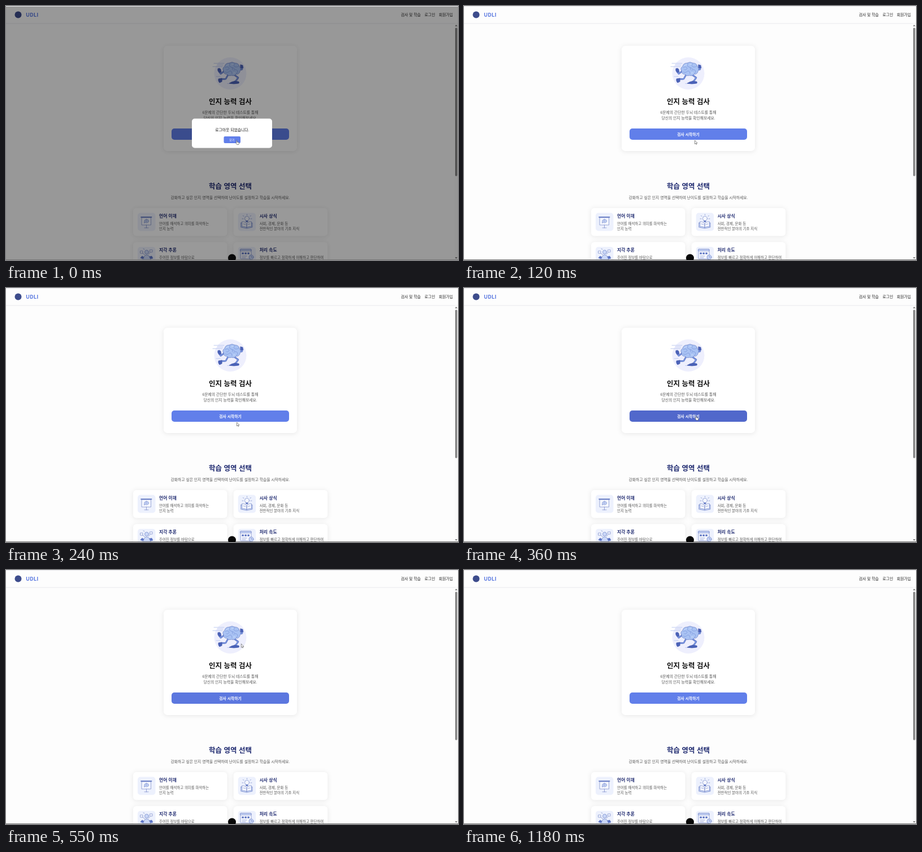
These frames come from a looping animation (800x450 px, 1610 ms). An HTML page:

```html
<!DOCTYPE html>
<html lang="ko">
<head>
<meta charset="utf-8">
<style>
html, body { margin: 0; width: 100%; height: 100%; overflow: hidden; background: #fdfdfd }
svg { display: block; width: 800px; height: 450px }
text { font: 6.8px "Noto Sans CJK KR", "Noto Sans KR", "Noto Sans CJK", sans-serif; fill: #555 }
.mid { text-anchor: middle }
.nav { font-weight: 500; fill: #222; text-anchor: end }
.head { font-size: 12.5px; font-weight: 700 }
.name { font-size: 7.8px; font-weight: 700; fill: #1f2a70 }
.desc { font-size: 6.43px }
.white { fill: #fff; font-weight: 600 }
.panel { fill: #fff; filter: drop-shadow(0 1.5px 4px rgba(0, 0, 0, .09)) }
.art { fill: #f6f8ff; stroke: #5f74bd; stroke-width: .6; stroke-linejoin: round; stroke-linecap: round }
.art .soft { fill: #cbd8f8 }
.art .dark { fill: #5b74c8 }
.art .line { fill: none }
.cursor { fill: #fff; stroke: #444; stroke-width: .6; stroke-linejoin: round }
</style>
</head>
<body>
<svg viewBox="0 0 800 450">
  <rect width="800" height="450" fill="#fdfdfd"/>
  <path d="M0 .5H800M0 31H800" stroke="#e9e9ec"/>
  <circle cx="21.5" cy="15.5" r="6" fill="#3d4c8c"/>
  <text x="35" y="19.4" style="font-size:9.4px;font-weight:700;fill:#5b79e0">UDLI</text>
  <text class="nav" x="734" y="18.4">검사 및 학습</text>
  <text class="nav" x="759.6" y="18.4">로그인</text>
  <text class="nav" x="791" y="18.4">회원가입</text>

  <rect class="panel" x="279" y="70.5" width="236" height="186.5" rx="7"/>
  <circle cx="397" cy="119.5" r="28.5" fill="#eeeffd"/>
  <g class="art">
    <path class="line" d="M368 101.5H386M374 104.5H384M366 107.5H383M372 125H379M392 137.5H406" stroke="#9db0e8"/>
    <g id="limbs" class="line">
      <path id="limb" d="M387 115L380 120L377 116M413 113L418 112L417 107M393 122L389 129L381 130M404 122L411 127L406 134" stroke="#4a62b8" stroke-width="2.4"/>
      <use href="#limb" stroke="#86a3ea"/>
      <path d="M387 115L380 120L377 116M413 113L418 112L417 107M393 122L389 129L381 130M404 122L411 127L406 134" stroke="#86a3ea" stroke-width="1.4"/>
    </g>
    <path d="M375 111q3-2 5 1l1 5q-4 2-6-2zM415 104l4 1 1 5-5 0zM382 128l-6 1q-1 4 2 7l4-2zM405 133l7 1q1 2 0 3q-9 2-17 0q4-3 10-4z" fill="#4a62b8" stroke="#4057a8"/>
    <path d="M385 115q-3-5 2-8q1-6 8-6q5-3 10 0q7 0 8 6q4 4 1 9q-1 5-7 5q-3 4-8 2q-5 2-8-2q-6 0-6-6z" fill="#a9c2f3"/>
    <path class="line" d="M388 109q4-3 7 1q-1 4-5 3M396 102q-2 5 2 6t3 5M405 102q-4 4 1 6q4 1 6-2M388 117q5 2 8-2q4 0 4 5M403 114q4-3 7 1q1 3-3 5M400 109q3 0 5 3" stroke="#6f8bd4"/>
    <path class="line" d="M390 106q3-3 5-2M399 104q3-2 4 0M402 119q2-2 4 0" stroke="#eaf1ff"/>
  </g>
  <text class="mid head" x="397" y="173.5" style="fill:#111">인지 능력 검사</text>
  <text class="mid" x="397" y="191.4">6문제의 간단한 두뇌 테스트를 통해</text>
  <text class="mid" x="397" y="201.4">당신의 인지 능력을 확인해보세요.</text>
  <rect id="start" x="293" y="217" width="208" height="20" rx="5"/>
  <text class="mid white" x="397" y="229.6">검사 시작하기</text>

  <text class="mid head" x="397" y="323.8" style="fill:#1f2a70">학습 영역 선택</text>
  <text class="mid" x="397" y="342">강화하고 싶은 인지 영역을 선택하여 난이도를 설정하고 학습을 시작하세요.</text>
  <g id="cards"></g>
  <g class="art">
    <path class="dark" d="M239 373.500h19v1.200h-19z"/>
    <path d="M240.500 375H256.500V388H240.500z"/>
    <path class="line" d="M248.500 388V393M245 393H252"/>
    <path class="soft" d="M248.500 378a4 3 0 1 1-2 5.500l-2 1l.5-2.500a4 3 0 0 1 3.500-4z"/>
    <path class="line" d="M247 381H250"/>

    <path class="soft" d="M416 384l10 3 10-3v8l-10 2-10-2z"/>
    <path d="M418 382q6 0 8 4v7q-3-3-8-2zM434 382q-6 0-8 4v7q3-3 8-2z"/>
    <circle cx="426.500" cy="376.500" r="4"/>
    <path class="dark" d="M425 380.500h3v2h-3z"/>
    <path class="line" d="M426.500 369v1.500M419.500 371.500l1.500 1M433.500 371.500l-1.500 1M418 377h2M433 377h2M420 386l4 1M432 386l-4 1"/>

    <circle class="soft" cx="249" cy="436" r="3.500"/>
    <path class="soft" d="M243 449q1-8 6-8t7 8z"/>
    <path class="dark" d="M238 446l3-3 3 2-2 3zM254 444l4-1 2 4-4 1z"/>
    <path d="M238 434h4v4h-4zM255 432h4v4h-4z"/>
    <path class="line" d="M242 438l4 3M255 437l-3 3M245 431l-2-1"/>

    <rect x="415" y="431" width="19" height="17" rx="1"/>
    <path class="soft" d="M415 431h19v3h-19z"/>
    <path class="dark" d="M418 437h2.500v2.500h-2.500zM423 437h2.500v2.500h-2.500zM428 437h2.500v2.500h-2.500z"/>
    <path class="line" d="M418 443h8M418 446h6"/>
    <circle class="soft" cx="434" cy="445" r="4"/>
    <path class="line" d="M434 443v2h2"/>
  </g>

  <rect x="794" y="31" width="6" height="419" fill="#fafafa"/>
  <rect x="795" y="38.500" width="3.600" height="263" rx="1.800" fill="#858585"/>
  <path d="M794.800 36L796.800 33L798.800 36zM794.800 445L796.800 448L798.800 445z" fill="#777"/>

  <g id="modal">
    <rect y="1" width="800" height="449" opacity=".4"/>
    <rect x="329" y="199.500" width="142" height="52" rx="5" fill="#fff"/>
    <text class="mid" x="400.300" y="222" style="fill:#111">로그아웃 되었습니다.</text>
    <rect x="385.500" y="231" width="29.500" height="12" rx="2" fill="#617fea"/>
    <text class="mid white" x="400" y="238.800" style="font-size:5px;font-weight:500">닫기</text>
  </g>
  <path d="M0 449.500H800" stroke="#777"/>
  <circle cx="400" cy="446.500" r="7" fill="#080808"/>
  <g id="cursor" class="cursor">
    <path id="arrow" d="M0 0V6.500L1.500 5.200L2.500 7.300L3.500 6.800L2.600 4.800H4.600z"/>
    <path id="hand" d="M-.7 .4q.7-.8 1.300 0V3l3 .7q.6.300.4 1.300L3.300 7.500H.2L-1.800 4.700q.2-.9 1.100-.3z"/>
  </g>
</svg>
<script>
const $ = id => document.getElementById(id);
const clamp = v => Math.max(0, Math.min(1, v));
const mix = (a, b, k) => a.map((v, i) => Math.round(v + (b[i] - v) * k));

const topics = [
  ['언어 이해', '언어를 해석하고 의미를 파악하는', '인지 능력'],
  ['시사 상식', '사회, 경제, 문화 등', '전반적인 분야의 기초 지식'],
  ['지각 추론', '주어진 정보를 바탕으로', ''],
  ['처리 속도', '정보를 빠르고 정확하게 이해하고 판단하여', '']
];
$('cards').innerHTML = topics.map(([name, first, second], i) => `
  <g transform="translate(${225 + i % 2 * 177.7} ${358 + (i >> 1) * 60.2})">
    <rect class="panel" width="166.500" height="49.500" rx="6"/>
    <rect x="8" y="8.500" width="31.500" height="32" rx="5" fill="#edf1fd"/>
    <text class="name" x="46" y="17">${name}</text>
    <text class="desc" x="46" y="29.800">${first}</text>
    <text class="desc" x="46" y="39.200">${second}</text>
  </g>`).join('');

function draw(now) {
  const t = now % 1610;
  const open = t < 120;
  const u = Math.max(0, (t - 270) / 180);
  const x = 408.500 + 5 * u, y = 238 - 44 * u * u;
  const hover = clamp((t - 290) / 100) * clamp((580 - t) / 120);
  const pointing = open || (t > 300 && t < 470);

  $('modal').style.display = open ? '' : 'none';
  $('start').setAttribute('fill', `rgb(${mix([97, 127, 234], [75, 94, 190], hover)})`);
  $('cursor').setAttribute('transform', `translate(${x} ${y})`);
  $('cursor').style.display = t < 700 ? '' : 'none';
  $('hand').style.display = pointing ? '' : 'none';
  $('arrow').style.display = pointing ? 'none' : '';
  requestAnimationFrame(() => draw(performance.now()));
}
draw(performance.now());
</script>
</body>
</html>
```
